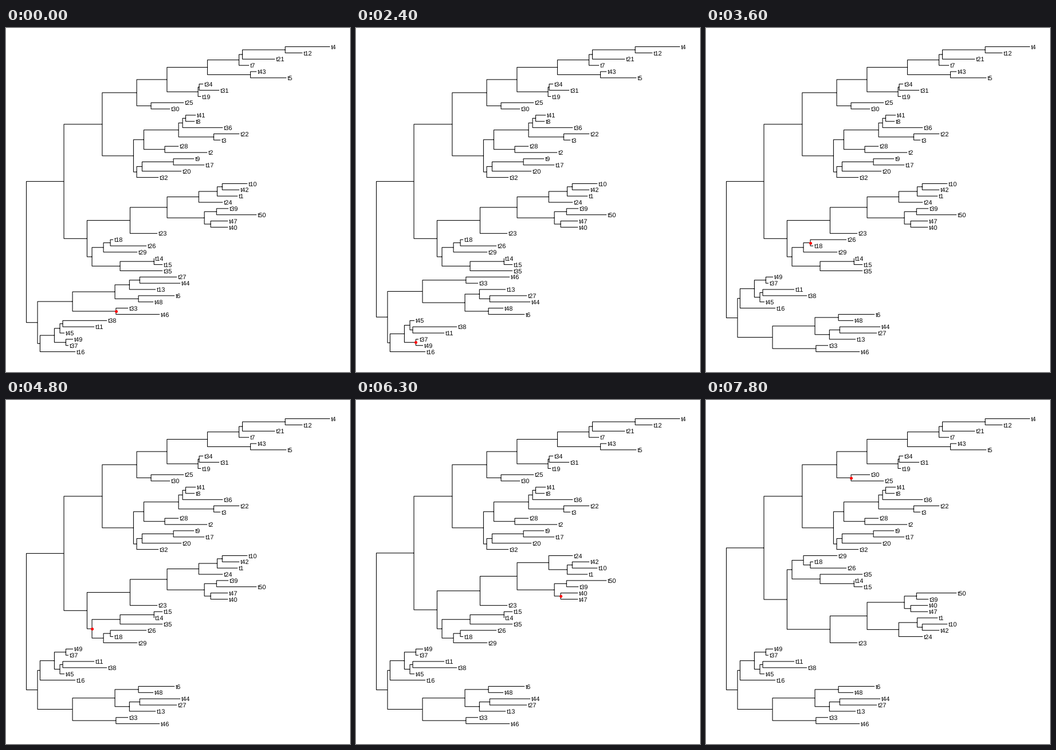
These frames come from a looping animation (600x600 px, 8000 ms). A matplotlib script:

```python
import math

import matplotlib.pyplot as plt
from matplotlib.animation import FuncAnimation

plt.rcParams["text.hinting"] = "none"

SIZE, DPI = 600, 100
PX = 72 / DPI              # points per pixel
TOP, BOTTOM = 32.6, 564.6  # first and last tip rows
STEP_TICKS, TICK_MS, TICKS = 3, 100, 80


class Node:
    """A branch point or, when it has a label, a tip. Kids run top to bottom."""

    def __init__(self, x, *kids, label=None, lower_first=False):
        self.x, self.kids, self.label = x, list(kids), label
        self.lower_first = lower_first
        self.y = 0

    def flip(self):
        self.kids.reverse()
        for kid in self.kids:
            kid.flip()

    def postorder(self):
        for kid in self.kids[::-1] if self.lower_first else self.kids:
            yield from kid.postorder()
        if self.kids:
            yield self

    def tips(self):
        if not self.kids:
            return [self]
        return [tip for kid in self.kids for tip in kid.tips()]

    def place(self):
        if self.kids:
            self.y = sum(kid.place() for kid in self.kids) / len(self.kids)
        return self.y


def tip(number, x):
    return Node(x, label=f"t{number}")


def upper_clade():
    n = Node
    fan = n(351.4,
            n(406.4, n(412.4, n(487, tip(4, 565), tip(12, 517)), tip(21, 469)), tip(7, 424)),
            n(426.4, tip(43, 437), tip(5, 489)))
    trio = n(335, n(337, tip(34, 344), tip(31, 372)), tip(19, 340))
    pair = n(253, tip(25, 310), tip(30, 286))
    comb = n(301,
             n(308, n(313.4, tip(41, 331), tip(8, 329)), tip(36, 378)),
             n(362.4, tip(22, 407), tip(3, 374)))
    tail = n(228, n(237.4, n(292, tip(9, 328), tip(17, 346)), tip(20, 306)), tip(32, 266))
    return n(167.8,
             n(228, n(280.8, fan, trio), pair, lower_first=True),
             n(222.4, n(240.4, comb, n(277, tip(28, 301), tip(2, 351))), tail))


def middle_clade():
    n = Node
    left = n(336.2, n(368.4, n(377.2, tip(10, 421), tip(42, 407)), tip(1, 404)), tip(24, 378))
    right = n(346, n(367.2, tip(39, 388), tip(50, 437)), n(357, tip(47, 387), tip(40, 387)))
    small = n(150,
              n(170, n(182, tip(18, 187), tip(26, 245)), tip(29, 229)),
              n(199, n(258.2, tip(14, 258.2), tip(15, 273)), tip(35, 273)))
    return n(141.4, n(216.4, n(281, left, right), tip(23, 264)), small, lower_first=True)


def lower_clade():
    n = Node
    five = n(190,
             n(215.3, n(233.3, tip(27, 298), tip(44, 304)), tip(13, 261)),
             n(231, tip(6, 294), tip(48, 257)))
    six = n(59.4,
            n(84.4,
              n(94, n(99, tip(38, 176), tip(11, 154)), tip(45, 102)),
              n(104.4, tip(49, 117), tip(37, 109))),
            tip(16, 121))
    return n(55, n(116, five, n(191.8, tip(33, 213), tip(46, 268)), lower_first=True), six)


def build_tree():
    crown = Node(101, upper_clade(), middle_clade(), lower_first=True)
    return Node(35.5, crown, lower_clade(), lower_first=True)


def tree_at(step):
    """The tree after `step` flips, and the node flipped last."""
    root = build_tree()
    order = list(root.postorder())
    for node in order[1:step + 1]:
        node.flip()
    tips = root.tips()
    for row, leaf in enumerate(tips):
        leaf.y = TOP + (BOTTOM - TOP) * row / (len(tips) - 1)
    root.place()
    return root, order[step]


def branches(node):
    xs, ys = [], []
    for kid in node.kids:
        xs += [node.x, node.x, kid.x, math.nan]
        ys += [node.y, kid.y, kid.y, math.nan]
        kid_xs, kid_ys = branches(kid)
        xs += kid_xs
        ys += kid_ys
    return xs, ys


fig = plt.figure(figsize=(SIZE / DPI, SIZE / DPI), dpi=DPI, facecolor="white")
ax = fig.add_axes([0, 0, 1, 1])
ax.set(xlim=(0, SIZE), ylim=(SIZE, 0))
ax.axis("off")

lines, = ax.plot([], [], color="black", lw=1.07 * PX, snap=False,
                 solid_capstyle="butt", solid_joinstyle="miter")
dot, = ax.plot([], [], "o", color="red", ms=5 * PX, mew=0, snap=False, zorder=3)
labels = {leaf.label: ax.text(0, 0, leaf.label, family="Liberation Sans",
                              size=11 * PX, color="black", va="baseline")
          for leaf in build_tree().tips()}


def update(tick):
    root, pivot = tree_at(tick // STEP_TICKS)
    lines.set_data(*branches(root))
    dot.set_data([pivot.x], [pivot.y])
    for leaf in root.tips():
        labels[leaf.label].set_position((leaf.x + 2, leaf.y + 4))
    return [lines, dot, *labels.values()]


anim = FuncAnimation(fig, update, frames=TICKS, interval=TICK_MS,
                     init_func=lambda: update(0), repeat=True, repeat_delay=0)
plt.show()
```
